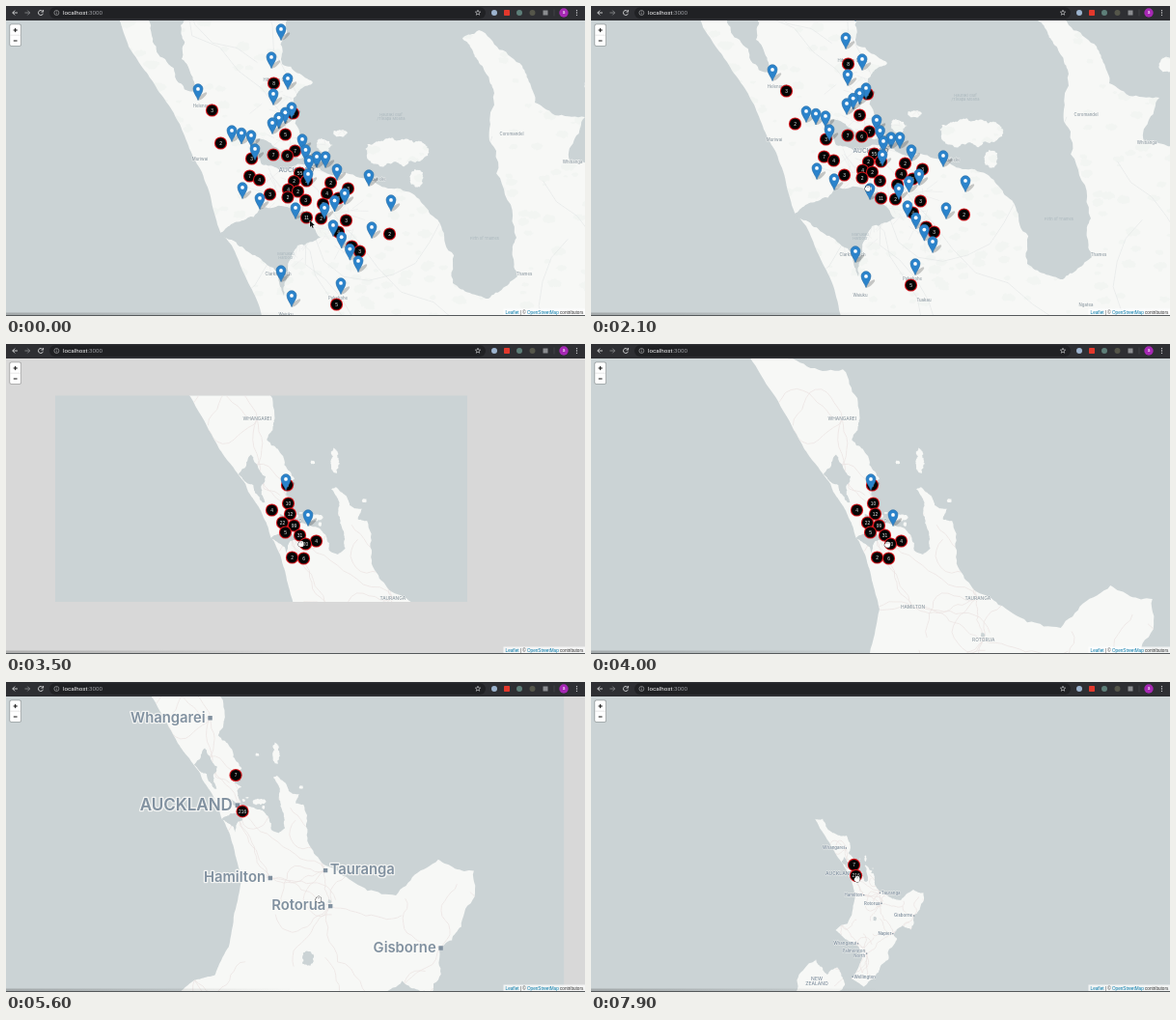
An HTML page with a canvas for the animation above (8000 ms loop, 600 by 321 pixels).

```html
<!DOCTYPE html>
<html lang="en">
<head>
<meta charset="utf-8">
<title>Clustered map</title>
<style>
html, body { margin: 0; width: 100%; height: 100%; overflow: hidden; background: #d8d8d8; }
canvas { display: block; width: 600px; height: 321px; }
</style>
</head>
<body>
<canvas id="stage"></canvas>
<script>
const W = 600, H = 321, LOOP = 8000;
const canvas = document.getElementById('stage');
const ratio = Math.max(1, window.devicePixelRatio || 1);
canvas.width = W * ratio;
canvas.height = H * ratio;
const c = canvas.getContext('2d');
const WATER = '#cbd3d5', LAND = '#f7f8f6', EMPTY = '#d8d8d8';
const SANS = 'Liberation Sans, Arial, sans-serif', ROBOTO = 'Roboto, sans-serif';

let seed = 7;
const rnd = () => (seed = (seed * 16807) % 2147483647) / 2147483647;
const lerp = (a, b, p) => a + (b - a) * p;

// Key points of the coast; world units equal stage pixels at the closest zoom.
const westCoast = [
  -348,-740, -172,-440, 7,-135, 85,-30, 117,12, 127,42, 152,78, 180,122, 203,172, 222,234, 234,248, 258,300,
  280,370, 320,531, 256,859, 189,996, 89,1020, -8,1105, 150,1252, 372,1372, 432,1570, 311,1831, 253,1904, 457,2040];
const eastCoast = [
  457,2040, 645,1871, 864,1590, 1010,1252, 955,1185, 1101,1024, 1244,1094, 1283,878, 1390,760, 1451,488, 1277,432,
  1071,608, 812,512, 660,379, 621,165, 584,160, 600,115, 548,100, 535,62, 490,25, 473,33, 488,55, 505,86, 508,150,
  529,240, 530,280, 500,303, 463,287, 452,232, 430,203, 384,184, 326,170, 312,145, 298,95, 318,79, 286,60, 290,20,
  320,-9, 250,-134, 204,-171, 229,-210, 168,-463, -85,-528, -221,-742, -348,-740];
const southIsland = [-400,1640, -334,1590, -230,1720, -150,1840, 20,1720, 144,2010, 0,2300, -760,2300, -400,1640];
const kaipara = [88,-28, 140,-110, 200,-20, 181,20, 182,55, 197,90, 165,55, 148,15, 112,0, 88,-28];
const manukau = [221,238, 246,222, 285,207, 326,240, 302,248, 292,272, 288,300, 281,278, 258,258, 221,238];
const waitemata = [322,152, 290,157, 258,138, 265,164, 300,165, 345,173, 322,152];

// Fractal line through the key points
function trace(path, list, rough) {
  const add = (x0, y0, x1, y1, depth) => {
    if (!depth) return path.lineTo(x1, y1);
    const k = (rnd() - .5) * rough;
    const mx = (x0 + x1) / 2 + (y1 - y0) * k, my = (y0 + y1) / 2 - (x1 - x0) * k;
    add(x0, y0, mx, my, depth - 1);
    add(mx, my, x1, y1, depth - 1);
  };
  path.lineTo(list[0], list[1]);
  for (let i = 2; i < list.length; i += 2) add(list[i - 2], list[i - 1], list[i], list[i + 1], 4);
}
function outline(path, list, rough) {
  trace(path, list, rough);
  path.closePath();
}
function blob(path, x, y, rx, ry) {
  const points = [];
  for (let i = 0; i < 10; i++) {
    const a = i * Math.PI / 5, r = .8 + rnd() * .4;
    points.push(x + Math.cos(a) * rx * r, y + Math.sin(a) * ry * r);
  }
  outline(path, [...points, points[0], points[1]], .5);
}

const land = new Path2D(), water = new Path2D();
trace(land, westCoast, .06);
trace(land, eastCoast, .26);
land.closePath();
outline(land, southIsland, .3);
blob(land, 402, 152, 34, 15);
blob(land, 329, 144, 8, 7);
blob(land, 346, 132, 7, 4);
blob(land, 426, 178, 7, 9);
blob(land, 488, -85, 18, 48);
blob(land, 396, -78, 9, 8);
blob(land, 609, 80, 10, 8);
[kaipara, manukau, waitemata].forEach(list => outline(water, list, .3));
blob(water, 642, 915, 28, 32);
blob(water, 748, 637, 9, 9);

const cities = [
  ['Whangarei', 165, -257], ['Auckland', 298, 168], ['Hamilton', 458, 522], ['Tauranga', 727, 485],
  ['Rotorua', 751, 659], ['Gisborne', 1289, 863], ['Napier', 940, 1160], ['New Plymouth', 89, 1020],
  ['Whanganui', 360, 1325], ['Palmerston\nNorth', 505, 1490], ['Wellington', 275, 1875]
];
const towns = [
  ['Helensville', 205, 104], ['Hibiscus Coast', 282, 77], ['Muriwai', 201, 159], ['Coromandel', 524, 133],
  ['Whitianga', 587, 162], ['Thames', 537, 278], ['Waiheke', 385, 180], ['Pukekohe', 344, 303],
  ['Clarks Beach', 282, 278], ['Waiuku', 290, 320], ['Tuakau', 356, 325], ['Ngatea', 524, 330]
];
const seas = [['Hauraki Gulf\n/Tīkapa Moana', 399, 114.5], ['Manukau\nHarbour', 290, 258.5], ['Firth of Thames', 496, 241]];

// Highways join neighbouring cities, small roads wander off from each.
const roads = new Path2D(), hills = new Path2D(), streets = new Path2D();
cities.forEach(([, x, y], i) => {
  for (const [, x1, y1] of cities.slice(i + 1)) {
    if (Math.hypot(x1 - x, y1 - y) > 560) continue;
    roads.moveTo(x, y);
    trace(roads, [x, y, x1, y1], .3);
  }
  for (let n = 0; n < 4; n++) {
    let px = x, py = y, a = rnd() * 6.3;
    roads.moveTo(px, py);
    for (let k = 0; k < 14; k++) {
      a += (rnd() - .5) * 1.2;
      roads.lineTo(px += Math.cos(a) * 26, py += Math.sin(a) * 26);
    }
  }
});
for (let i = 0; i < 500; i++) {
  const r = 2 + rnd() * 6;
  blob(hills, 100 + rnd() * 560, -40 + rnd() * 420, r, r * .6);
}
for (let i = 0; i < 170; i++) {
  const x = 265 + rnd() * 95, y = 90 + rnd() * 180, a = rnd() * 6.3, l = 8 + rnd() * 16;
  streets.moveTo(x, y);
  streets.lineTo(x + Math.cos(a) * l, y + Math.sin(a) * l);
}

// Evenly spaced markers between two places: counts for clusters, "." for pins
const row = (marks, x0, y0, x1 = x0, y1 = y0) => marks.split(' ').map((n, i, all) => {
  const p = i / Math.max(1, all.length - 1);
  return { n: n === '.' ? '' : n, x: lerp(x0, x1, p), y: lerp(y0, y1, p) + (n === '.' ? 11.5 : 0) };
});
const layer = (s, ox, oy, ...rows) => rows.flat()
  .map(m => ({ n: m.n, x: (m.x - ox) / s, y: (m.y - oy) / s }))
  .sort((a, b) => a.y - b.y);
const markers = {
  1: layer(1, 0, 0,
    row('8 2', 277, 80, 297, 111), row('3 2', 213, 108, 222, 142), row('5 6', 289, 133, 291, 155),
    row('3 7 7', 254, 158, 299, 150), row('7 4', 252, 176, 262, 180), row('55 2 4', 304, 173, 292, 190),
    row('2 2', 311, 181, 302, 192), row('3 2 3', 273, 195, 310, 201), row('2 4 3', 336, 183, 328, 205),
    row('3 5', 354, 189, 344, 199), row('11 2', 311, 219, 326, 220), row('3 4', 352, 222, 344, 234),
    row('3 3', 358, 249, 366, 254), row('2', 397, 236), row('5', 342, 309),
    row('. .', 285, 24, 275, 53), row('. .', 292, 75, 277, 91), row('. . . .', 296, 105, 276, 121),
    row('. . .', 234, 129, 254, 134), row('. . .', 307, 138, 314, 160), row('. .', 322, 156, 331, 156),
    row('. .', 343, 169, 376, 175), row('. .', 399, 201, 379, 229), row('. .', 245, 188, 263, 199),
    row('. .', 313, 174, 300, 209), row('. . .', 351, 194, 330, 209), row('. . . .', 339, 227, 365, 264),
    row('. .', 285, 274, 296, 300), row('.', 347, 287), row('.', 258, 148), row('.', 199, 86)),
  .25: layer(.25, 219, 142,
    row('6 10', 291, 146, 292, 165), row('12 99', 294, 176, 298, 188), row('22 5', 286, 185, 289, 195),
    row('31 20', 304, 198, 310, 207), row('2 6', 296, 221, 308, 222), row('4', 275, 172), row('4', 321, 204),
    row('.', 290, 140), row('.', 313, 177)),
  .125: layer(.125, 264.5, 175.5,
    row('7 10', 300, 178, 301, 187), row('4', 292, 190), row('169', 303, 199), row('28 5', 309, 210, 315, 205)),
  .0625: layer(1, 0, 0, row('7', 288, 22), row('216', 321, 198))
};
markers[.5] = markers[.25];

// Camera moves: start, end, scale, offset x, offset y
const moves = [
  [0, 0, 1, 0, 0],
  [700, 2000, 1, -11, -20],
  [2500, 2750, .5, 142.5, 88],
  [3150, 3400, .25, 219, 142],
  [4250, 4500, .125, 264.5, 175.5],
  [5000, 5250, .0625, 286, 191.5],
  [5497, 5747, .25, 149, 67],
  [7100, 7350, .0625, 254, 188]
];
const pointer = [
  [0, 315, 225], [700, 297, 208], [2000, 286, 188], [2500, 296, 196], [3150, 296, 196], [3450, 306, 207],
  [4800, 310, 209], [5440, 324, 225], [5800, 324, 225], [6700, 288, 225], [7400, 288, 225], [7850, 276, 204], [8000, 276, 204]
];

function camera(t) {
  let view = [1, 0, 0], tile = 1, box = null;
  for (const [a, b, ...next] of moves) {
    if (t < a) break;
    const p = b > a ? Math.min(1, (t - a) / (b - a)) : 1, e = 1 - (1 - p) ** 3;
    if (p < 1 && next[0] !== tile) box = tileBox(next[0] < tile ? view : next, tile);
    view = view.map((v, i) => lerp(v, next[i], e));
    if (p === 1) tile = next[0];
  }
  // Some tiles arrive late after two of the zooms.
  if (t >= 3400 && t < 3850) box = tileBox(moves[2].slice(2), .25);
  if (t >= 5747 && t < 7350) box = [-1100, -781, 1890, 500];
  return { s: view[0], ox: view[1], oy: view[2], tile, box };
}
// Whole tiles that cover a view
function tileBox([s, ox, oy], tile) {
  const size = 106.75 / tile;
  const snap = (v, anchor, round) => anchor + round((v - anchor) / size) * size;
  return [snap(-ox / s, 1890, Math.floor), snap(-oy / s, 500, Math.floor),
    snap((W - ox) / s, 1890, Math.ceil), snap((H - oy) / s, 500, Math.ceil)];
}
function pointerAt(t) {
  const i = pointer.findIndex(k => k[0] > t), a = pointer[i - 1], b = pointer[i];
  const p = (t - a[0]) / (b[0] - a[0]), e = p * p * (3 - 2 * p);
  return [lerp(a[1], b[1], e), lerp(a[2], b[2], e)];
}

const box = (x, y, w, h, fill, r = 0) => {
  c.fillStyle = fill;
  c.beginPath();
  c.roundRect(x, y, w, h, r);
  c.fill();
};
const disc = (x, y, r, fill) => {
  c.fillStyle = fill;
  c.beginPath();
  c.arc(x, y, r, 0, 7);
  c.fill();
};
const line = (color, width, ...p) => {
  c.strokeStyle = color;
  c.lineWidth = width;
  c.beginPath();
  for (let i = 0; i < p.length; i += 2) c.lineTo(p[i], p[i + 1]);
  c.stroke();
};
const arc = (color, width, x, y, r, from, to) => {
  c.strokeStyle = color;
  c.lineWidth = width;
  c.beginPath();
  c.arc(x, y, r, from, to);
  c.stroke();
};
function write(text, x, y, size, fill, align = 'left', font = ROBOTO, weight = 400, halo = 0) {
  c.font = `${weight} ${size}px ${font}`;
  c.textAlign = align;
  c.textBaseline = 'middle';
  if (halo) {
    c.strokeStyle = 'rgba(250,250,248,.8)';
    c.lineWidth = halo;
    c.strokeText(text, x, y);
  }
  c.fillStyle = fill;
  c.fillText(text, x, y);
}

function drawLabel(text, x, y, size, color, tile, align = 'center', weight = 500, halo = .8) {
  c.save();
  c.translate(x, y);
  c.scale(1 / tile, 1 / tile);
  text.split('\n').forEach((part, i, all) =>
    write(part, 0, (i - (all.length - 1) / 2) * size, size, color, align, 'Inter, sans-serif', weight, halo));
  c.restore();
}
function drawLabels(tile) {
  const slate = '#8191a0', grey = '#8d9aa3';
  if (tile === 1) {
    for (const [name, x, y] of towns) drawLabel(name, x, y, 4.3, grey, tile);
    for (const [name, x, y] of seas) drawLabel(name, x, y, 4, '#aab7bd', tile, 'center', 400, 0);
    drawLabel('AUCKLAND', 301, 170, 6.6, slate, tile);
  } else if (tile >= .25) {
    for (const [name, x, y] of cities) drawLabel(name.toUpperCase(), x, y, 4.8, grey, tile);
  } else {
    const far = tile < .1;
    for (const [name, x, y] of cities) {
      if (far && name === 'New Plymouth') continue;
      const left = far && /Taur|Well/.test(name), big = name === 'Auckland' || (!far && name === 'Hamilton');
      drawLabel(big ? name.toUpperCase() : name, x + (left ? 1.4 : -1.4) / tile, y - (far ? 0 : 1.5 / tile),
        big ? 5 : 4.35, slate, tile, left ? 'left' : 'right', 600);
      box(x - .6 / tile, y - .6 / tile, 1.3 / tile, 1.3 / tile, slate);
    }
    drawLabel('NEW\nZEALAND', -320, 1945, 5, slate, tile);
  }
}

function drawMap(v) {
  c.save();
  c.translate(v.ox, v.oy);
  c.scale(v.s, v.s);
  if (v.box) {
    const [x0, y0, x1, y1] = v.box;
    c.beginPath();
    c.rect(x0, y0, x1 - x0, y1 - y0);
    c.clip();
  }
  c.fillStyle = WATER;
  c.fillRect(-v.ox / v.s, -v.oy / v.s, W / v.s, H / v.s);
  c.fillStyle = LAND;
  c.fill(land);
  c.save();
  c.clip(land);
  c.lineJoin = 'round';
  if (v.s > .4) {
    c.fillStyle = 'rgba(220,227,222,.2)';
    c.fill(hills);
    c.strokeStyle = '#ebedec';
    c.lineWidth = .7;
    c.stroke(streets);
  }
  c.strokeStyle = v.s > .4 ? '#e6e9e9' : '#ebe3e1';
  c.lineWidth = .7 / v.s;
  c.stroke(roads);
  c.restore();
  c.fillStyle = WATER;
  c.fill(water);
  c.lineJoin = 'round';
  drawLabels(v.tile);
  c.restore();
}

function drawPin(x, y) {
  c.save();
  c.translate(x, y);
  c.fillStyle = 'rgba(0,0,0,.2)';
  c.beginPath();
  c.ellipse(4.5, -4, 6, 1.9, -.7, 0, 7);
  c.fill();
  c.beginPath();
  c.moveTo(0, 0);
  c.bezierCurveTo(-1.2, -4, -5, -7.5, -5, -11.8);
  c.arc(0, -11.8, 5, Math.PI, 0);
  c.bezierCurveTo(5, -7.5, 1.2, -4, 0, 0);
  c.fillStyle = '#2b83cb';
  c.fill();
  c.strokeStyle = '#2c6fa5';
  c.lineWidth = .6;
  c.stroke();
  disc(0, -11.6, 1.9, '#fff');
  c.restore();
}
function drawCluster(x, y, n) {
  disc(x, y, 6.6, '#d3141b');
  disc(x, y, 5.5, '#050505');
  write(n, x, y + .3, 4.9, '#e6e6e6', 'center', SANS);
}

function drawCursor(t) {
  const [x, y] = pointerAt(t), arrow = t < 650;
  c.save();
  c.translate(x, y);
  c.lineJoin = 'round';
  c.beginPath();
  if (arrow) {
    [[0, -3], [0, 4], [1.6, 2.6], [2.7, 5], [3.7, 4.5], [2.7, 2.2], [4.8, 2.1]].forEach(p => c.lineTo(...p));
    c.closePath();
  } else {
    c.roundRect(-2.4, -2.9, 4.9, 6, 2.2);
    c.roundRect(-3.2, -1, 2, 3, 1);
  }
  c.strokeStyle = arrow ? '#fff' : '#222';
  c.lineWidth = .8;
  c.stroke();
  c.fillStyle = arrow ? '#111' : '#fff';
  c.fill();
  if (!arrow) for (const dx of [-.8, .6]) line('#555', .4, dx, -2.5, dx, -.6);
  c.restore();
}

function drawControls() {
  box(3.4, 18.5, 12.6, 23.2, 'rgba(0,0,0,.25)', 2);
  box(4.2, 19.3, 11, 21.6, '#fff', 1.5);
  line('#ccc', .5, 4.2, 30.2, 15.2, 30.2);
  line('#111', 1, 7.6, 25, 11.8, 25);
  line('#111', 1, 9.7, 22.9, 9.7, 27.1);
  line('#111', 1, 7.8, 36, 11.6, 36);

  box(515.5, 313.5, 84.5, 7, 'rgba(255,255,255,.75)');
  const parts = [[' contributors', '#333'], ['OpenStreetMap', '#0078a8'], [' | © ', '#333'], ['Leaflet', '#0078a8']];
  let x = 598.3;
  for (const [text, color] of parts) {
    write(text, x, 317.3, 4.65, color, 'right', SANS);
    x -= c.measureText(text).width;
  }
  const shade = c.createLinearGradient(0, 0, 300, 0);
  shade.addColorStop(0, 'rgba(70,70,70,.3)');
  shade.addColorStop(1, 'rgba(70,70,70,0)');
  c.fillStyle = shade;
  c.fillRect(0, 317.5, 300, 2.5);
  box(0, 320, W, 1, '#55595b');
}

function drawBar() {
  const ink = '#d6d7d9', dim = '#85878a', soft = '#b5b7b9';
  box(0, 0, W, 15, '#2e2f33');
  box(45, 1.3, 452, 11.6, '#202124', 5.8);
  line(ink, .9, 12, 7, 6.8, 7);
  line(ink, .9, 9.2, 4.6, 6.8, 7, 9.2, 9.4);
  line(dim, .9, 19.5, 7, 24.7, 7);
  line(dim, .9, 22.3, 4.6, 24.7, 7, 22.3, 9.4);
  arc(ink, .9, 36, 7, 2.5, .3, 5.5);
  line(ink, .9, 38.6, 4, 38.6, 6.1, 36.5, 6.1);
  arc(soft, .6, 52.4, 7, 2.5, 0, 7);
  line(soft, .6, 52.4, 6.6, 52.4, 8.5);
  disc(52.4, 5.6, .4, soft);
  write('localhost', 59, 7.2, 6.25, '#f1f1f2');
  write(':3000', 59 + c.measureText('localhost').width, 7.2, 6.25, '#9a9ca0');
  const star = [];
  for (let i = 0; i <= 10; i++) {
    const a = i * Math.PI / 5 - Math.PI / 2, r = i % 2 ? 1.2 : 2.8;
    star.push(489 + Math.cos(a) * r, 7 + Math.sin(a) * r);
  }
  line(ink, .6, ...star);
  disc(506, 7, 3, '#9db4cf');
  box(516, 4, 6, 6, '#e2382c', .8);
  disc(532, 7, 3, '#5e7f79');
  disc(545.5, 7, 3, '#55564a');
  box(556.5, 4.5, 5, 5, '#8b8d90');
  line('#55575b', .5, 568, 3.5, 568, 10.5);
  disc(578, 7, 4.7, '#a628b4');
  write('a', 578, 7, 5, '#fff', 'center');
  for (const y of [4.7, 7, 9.3]) disc(591.5, y, .65, ink);
}

function frame(t) {
  const v = camera(t);
  c.setTransform(ratio, 0, 0, ratio, 0, 0);
  box(0, 0, W, H, EMPTY);
  drawMap(v);
  for (const m of markers[v.tile]) {
    const x = v.ox + m.x * v.s, y = v.oy + m.y * v.s;
    if (m.n) drawCluster(x + .5, y, m.n);
    else drawPin(x, y);
  }
  drawControls();
  drawCursor(t);
  drawBar();
}
const start = performance.now();
function tick() {
  frame(Math.max(0, performance.now() - start) % LOOP);
  requestAnimationFrame(tick);
}
tick();
</script>
</body>
</html>
```
